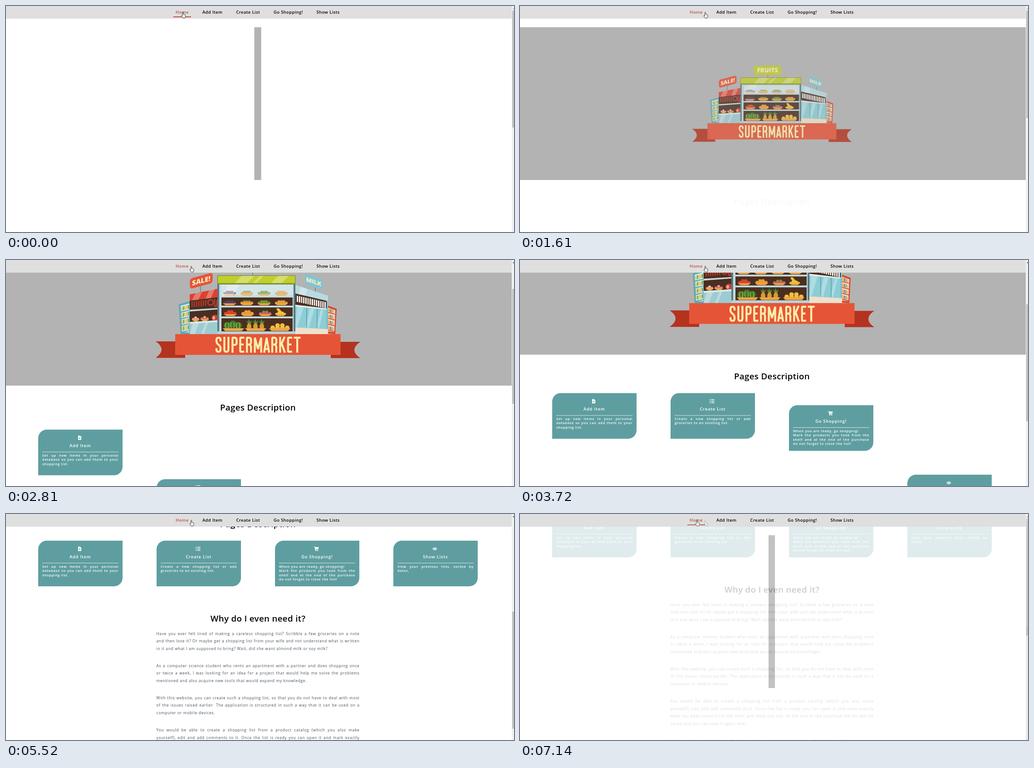
An HTML page that plays this animation: 1120x500 px, repeating every 7.21 s.

```html
<!DOCTYPE html>
<html lang="en">
<head>
<meta charset="utf-8">
<title>Shopping list</title>
<style>
html, body { margin: 0; width: 100%; height: 100%; overflow: hidden; background: #fff; }
body, .stage { position: absolute; width: 1120px; height: 500px; overflow: hidden; }
.stage { left: 0; top: 0; background: #fff; font-family: "Open Sans", "Noto Sans", sans-serif; }
.stage div, .stage svg { position: absolute; }
.page { left: 0; top: 0; width: 1115px; height: 1100px; }
.banner { left: 0; top: 47px; width: 1115px; height: 338px; background: #b3b3b3; transform-origin: 555px 0; }
.art { left: 0; top: 0; transform-origin: 555.5px 218px; }
h1 { position: absolute; left: 0; width: 1111px; margin: 0; text-align: center; font: 600 18.7px/26px "Open Sans", "Noto Sans", sans-serif; letter-spacing: .36px; color: #000; }
.card { top: 470px; width: 186.5px; height: 100.5px; background: #5f9ea0; border-radius: 18.7px 0; color: #fff; }
.card svg { left: 86.5px; top: 13px; }
.card h2 { position: absolute; left: 0; top: 29px; width: 100%; margin: 0; text-align: center; font-size: 9.33px; font-weight: 600; line-height: 14px; letter-spacing: .8px; }
.card hr { position: absolute; left: 9.5px; top: 48.5px; width: 167.5px; height: 1px; margin: 0; border: 0; background: #d9e7e7; }
.card p { position: absolute; left: 9.5px; top: 53px; width: 168px; margin: 0; font-size: 7.6px; font-weight: 600; line-height: 9.4px; letter-spacing: .65px; }
.text { left: 331.5px; top: 667.5px; width: 448px; font-size: 8.4px; line-height: 16.65px; letter-spacing: .69px; color: #434f5b; }
.text p { margin: 0 0 21.2px; }
p span { display: block; white-space: nowrap; }
p .full { text-align: justify; text-align-last: justify; }
.nav { left: 0; top: 0; width: 1115px; height: 28px; background: #dfdfdf; }
.nav b { position: absolute; top: 6.7px; font-size: 9.33px; font-weight: 600; line-height: 14px; letter-spacing: .43px; white-space: nowrap; color: #000; }
.nav b:first-child { color: #b9543f; }
.line { left: 368.5px; top: 22.7px; width: 39.5px; height: 2px; background: #c0503f; }
.bar { left: 1115px; top: 0; width: 5px; height: 500px; background: #f1f1f1; }
.thumb { left: 1px; top: 10px; width: 4px; background: #c1c1c1; }
.arrow { left: 2px; top: 4px; border: 3px solid transparent; border-top: 0; border-bottom: 3px solid #a3a3a3; }
.hand { left: 0; top: 13px; overflow: visible; }
</style>
</head>
<body>
<div class="stage">
  <div class="page">
    <div class="banner"></div>
    <svg class="art" width="1115" height="400"></svg>
    <h1 class="pages" style="top:419.7px">Pages Description</h1>
    <h1 class="why" style="top:629px">Why do I even need it?</h1>
    <div class="text"></div>
  </div>
  <div class="nav"></div>
  <div class="line"></div>
  <div class="bar"><div class="arrow"></div><div class="thumb"></div></div>
  <svg class="hand" width="10" height="14"><path d="M3 1.6Q3.2.5 4 .5T5 1.6V5.6L8.2 6.3Q9.5 6.7 9.5 8V10Q9.2 12 8.2 13.5H3.8Q2.4 11 .6 9.2Q.5 7.4 3 8.6Z" fill="#fff" stroke="#222" stroke-width=".9"/></svg>
</div>
<script>
const LOOP = 7210;
const stage = document.querySelector('.stage');
const $ = (root, name) => root.querySelector('.' + name);

// ---- page text ----
const lines = s => s.split('|').map(l =>
  l[0] === '-' ? `<span>${l.slice(1)}</span>` : `<span class="full">${l}</span>`).join('');

const menu = [['Home', 374], ['Add Item', 433], ['Create List', 507.5], ['Go Shopping!', 590], ['Show Lists', 684.5]];
$(stage, 'nav').innerHTML = menu.map(([s, x]) => `<b style="left:${x}px">${s}</b>`).join('');

const cards = [
  ['Add Item', 'Set up new items in your personal|database so you can add them to your|-shopping list.',
    '<path d="M2 0H6L9 3V10H2Z" fill="#fff"/><path d="M5.5 4V8M3.5 6H7.5" stroke="#5f9ea0"/>'],
  ['Create List', 'Create a new shopping list or add|-groceries to an existing list.',
    '<path d="M0 1.5H2M0 5H2M0 8.5H2M3.5 1.5H10.5M3.5 5H10.5M3.5 8.5H10.5" stroke="#fff" stroke-width="1.5"/>'],
  ['Go Shopping!', '-When you are ready, go shopping!|Mark the products you took from the|shelf and at the end of the purchase|-do not forget to close the list!',
    '<path d="M0 0H2.3L2.6 1.2H10.6L9.5 5.8H3.6L3.8 6.8H9.2V8H2.8L1.4 1.2H0Z" fill="#fff"/><circle cx="4" cy="9" r="1.1" fill="#fff"/><circle cx="8.4" cy="9" r="1.1" fill="#fff"/>'],
  ['Show Lists', 'View your previous lists, sorted by|-dates.',
    '<path d="M.3 5Q5.3-2 10.3 5Q5.3 12 .3 5Z" fill="#fff"/><circle cx="5.3" cy="5" r="2.1" fill="#fff" stroke="#5f9ea0"/>'],
];
$(stage, 'page').insertAdjacentHTML('beforeend', cards.map(([title, body, icon], i) =>
  `<div class="card" style="left:${70.5 + 261 * i}px"><svg width="11" height="10">${icon}</svg>
   <h2>${title}</h2><hr><p>${lines(body)}</p></div>`).join(''));

$(stage, 'text').innerHTML = [
  'Have you ever felt tired of making a careless shopping list? Scribble a few groceries on a note|and then lose it? Or maybe get a shopping list from your wife and not understand what is written|-in it and what I am supposed to bring? Wait, did she want almond milk or soy milk?',
  'As a computer science student who rents an apartment with a partner and does shopping once|or twice a week, I was looking for an idea for a project that would help me solve the problems|-mentioned and also acquire new tools that would expand my knowledge.',
  'With this website, you can create such a shopping list, so that you do not have to deal with most|of the issues raised earlier. The application is structured in such a way that it can be used on a|-computer or mobile devices.',
  'You would be able to create a shopping list from a product catalog (which you also make|yourself), edit and add comments to it. Once the list is ready you can open it and mark exactly|what has been taken from the shelf and what has not. At the end of the purchase the list will be|-saved and you can view it again later.',
  '-And most importantly, you will no longer be confused with almond milk and soy milk!',
].map(p => `<p>${lines(p)}</p>`).join('');

// ---- shop illustration ----
const poly = (fill, pts, more = '') => `<polygon points="${pts}" fill="${fill}" ${more}/>`;
const rect = (fill, x, y, w, h, more = '') => `<rect x="${x}" y="${y}" width="${w}" height="${h}" fill="${fill}" ${more}/>`;
const oval = (fill, x, y, rx, ry = rx) => `<ellipse cx="${x}" cy="${y}" rx="${rx}" ry="${ry}" fill="${fill}"/>`;
const repeat = (n, fn) => Array.from({ length: n }, (_, i) => fn(i)).join('');
const shine = pts => poly('#fff', pts, 'opacity=".3"');

// two rows of produce on a plate
function pile(x, y, w, color, r, top = color) {
  const n = Math.round(w / r / 1.9), step = (w - 2 * r) / (n - 1);
  return [1, 0].map(j => repeat(n - j * 2, i =>
    oval(j ? top : color, x + r + (i + j) * step, y - r * (.7 + j), r, r * .9))).join('')
    + poly('#eda548', `${x - 1},${y - 1} ${x + w + 1},${y - 1} ${x + w - 5},${y + 3} ${x + 5},${y + 3}`);
}

// a slanted row of bottles
const bottles = (x, y, n, dx, dy, h, colors) => repeat(n, i =>
  rect(colors[i % colors.length], x + i * dx, y + i * dy, dx * .62, h, 'rx="1"'));

const sign = (x, y, skew, w, h, fill, label, size) =>
  `<g transform="translate(${x} ${y}) skewY(${skew})">${rect(fill, -w / 2, -h / 2, w, h, 'rx="6"')}
   <text y="${size * .36}" text-anchor="middle" font-size="${size}" font-weight="800" fill="#fdf0c4">${label}</text></g>`;

const glyphs = {
  S: ['M11 10V7Q11 2 6.5 2T2 7V10Q2 14 6.5 17.5T11 25V28Q11 33 6.5 33T2 28V25', 17.4],
  U: ['M2 0V28Q2 33 6.5 33T11 28V0', 18],
  P: ['M2 35V2H6Q11 2 11 7V13Q11 18 6 18H2', 17],
  E: ['M11 2H2V33H11M2 17H9.5', 14.8],
  R: ['M2 35V2H6Q11 2 11 7V12Q11 17 6 17H2M6 17Q11 18 11 23V35', 17.4],
  M: ['M2 35V2L9 27 16 2V35', 21],
  A: ['M1.5 35L7 2 12.5 35M3 27H11', 17.4],
  K: ['M2 0V35M12 0L3 20M5.5 15L12.5 35', 17.4],
  T: ['M0 2H15M7.5 2V35', 15],
};
let penX = 462;
const lettering = [...'SUPERMARKET'].map(c => {
  const [d, advance] = glyphs[c], x = penX;
  penX += advance;
  return `<path d="${d}" transform="translate(${x} 170)"/>`;
}).join('');

const brown = '#4b2e20', lime = '#bfcf2c', ice = '#c3dde0', red = '#e65437', orange = '#f09a32', green = '#6f9a2e', plum = '#5b3f66';
const shelfColors = [plum, orange, green, '#e2a13a'];

const farLeft = poly('#5aa9b4', '381,98 406,91 406,164 385,164') + poly('#d8ebe6', '385,101 404,96 404,160 388,160')
  + repeat(4, j => bottles(387, 103 + j * 15, 5, 3.5, -.9, 9, ['#e9b43c', '#5c9440', '#d9c93a'])
    + poly('#5aa9b4', `385,${114 + j * 15} 404,${110 + j * 15} 404,${112 + j * 15} 385,${117 + j * 15}`));

const meat = poly(brown, '405,88 470,80 470,164 405,164')
  + repeat(7, i => rect('#b53a2c', 409 + i * 5, 91 - i * .5, 2.6, 14, 'rx="1.3"'))
  + `<g fill="none" stroke="#b53a2c" stroke-width="3"><circle cx="451" cy="94" r="6"/><path d="M460 86V102Q466 106 465 88"/></g>`
  + poly(ice, '405,110 470,106 470,109 405,114')
  + pile(410, 133, 16, '#ef9a8a', 3, '#f6c9bb') + pile(429, 132, 18, '#e2786a', 3, '#f0b3a4') + oval('#c8402f', 461, 128, 8, 7) + oval('#f0a394', 458, 128, 3, 4)
  + poly('#9ecbd1', '405,140 470,136 470,164 405,164') + shine('412,140 426,139 416,164 405,164') + shine('440,138 446,138 436,164 430,164')
  + poly('#d8ecee', '405,137 470,133 470,137 405,141')
  + poly('#df4030', '405,76 470,63 470,82 405,90') + shine('418,73 432,71 424,88 410,89') + shine('448,67 460,65 452,84 440,86');

const dairy = poly('#7fbfca', '638,62 710,81 710,164 638,164')
  + poly(brown, '638,72 707,89 707,109 638,101')
  + bottles(641, 79, 14, 4.7, 1.05, 14, ['#fbf6e8', '#fff', '#e9eef0'])
  + poly('#e3f0f0', '638,99 707,107 707,110 638,103')
  + poly('#8ccdd6', '638,103 706,110 706,153 638,149')
  + shine('642,103 656,105 643,148 638,148') + shine('670,107 680,108 668,150 660,150') + shine('694,109 700,110 690,152 684,152')
  + rect('#5f9fab', 662, 106, 1.6, 45) + rect('#5f9fab', 685, 108, 1.6, 44)
  + poly('#efe0cc', '638,149 710,153 710,164 638,164')
  + poly('#b8dbe2', '638,55 710,79 710,91 638,74') + shine('650,59 664,64 660,79 645,76');

const farRight = poly('#d8442f', '707,100 729,108 726,164 707,162') + poly('#ece4d2', '709,105 726,111 724,160 709,158')
  + repeat(4, j => bottles(710, 107 + j * 13, 4, 3.7, 1, 8, ['#e9b43c', '#d8442f', '#4e97a5'])
    + poly('#d8442f', `709,${115 + j * 13} 725,${119 + j * 13} 725,${121 + j * 13} 709,${117 + j * 13}`));

const melons = [0, 1, 2].map(i => oval('#3f7a2c', 488 + i * 12, 145 - i % 2 * 3, 8)
  + `<path d="M${485 + i * 12} 139q-3 6 0 12m5-12q3 6 0 12" fill="none" stroke="#a3bf4a" stroke-width="1.4"/>`).join('');
const pineapples = repeat(3, i => `<path d="M${534 + i * 14} 143l-4-9 4 3 1-7 3 7 4-3-3 9z" fill="#4f8f3a"/>`
  + oval('#d99a2e', 536 + i * 14, 148, 5, 8));

const centre = rect('#577a81', 466, 53, 172, 111) + rect(ice, 470, 54, 164, 108) + rect(brown, 475, 55, 157, 103)
  + rect('#cfe3e8', 475, 55, 157, 24)
  + [79, 101, 125].map(y => rect(ice, 470, y, 164, 4)).join('') + rect('#b9d3d8', 466, 158, 172, 6)
  + [76, 97].map(y => repeat(4, i => pile(479 + i * 38, y, 28, shelfColors[i], 3, i === 1 ? green : shelfColors[i]))).join('')
  + rect('#dbe9ec', 475, 55, 157, 24, 'opacity=".35"') + shine('490,55 515,55 500,79 476,79')
  + pile(481, 121, 27, '#dd4030', 3.8) + pile(519, 121, 27, orange, 3.8) + pile(558, 121, 27, '#d8616c', 3.4, green)
  + '<path d="M596 107Q600 120 616 119Q606 114 602 107Z" fill="#f2c433"/>' + pile(594, 121, 23, '#f2c433', 2.6)
  + melons + pineapples + pile(583, 153, 42, '#efc03c', 5)
  + [478, 527, 580].map(x => poly('#eda548', `${x},151 ${x + 47},151 ${x + 42},157 ${x + 5},157`)).join('')
  + rect(lime, 466.5, 34.5, 171, 19, 'stroke="#76801f"') + shine('520,35 548,35 530,53 502,53') + shine('560,35 568,35 550,53 542,53') + shine('600,35 624,35 606,53 582,53')
  + rect('#8f9a28', 467, 51, 170, 2);

const poles = rect('#6f7f84', 428, 58, 1.5, 14) + rect('#6f7f84', 543, 27, 1.5, 7) + rect('#6f7f84', 681, 58, 1.5, 12);
const signs = sign(430.5, 46, -15, 50, 23, red, 'SALE!', 15) + sign(543, 14, 0, 78, 27, lime, 'FRUITS', 17)
  + sign(678.5, 48, 18, 38, 24, '#82c4d4', 'MILK', 13);

const ribbon = '<path d="M330 180H395V216.5H330Q356 198 330 180ZM781 181H716V217H781Q755 199 781 181Z" fill="#b5321f"/>'
  + rect(red, 373, 164, 364.5, 46)
  + `<g role="img" aria-label="SUPERMARKET" fill="none" stroke="#fdeea7" stroke-width="4.3" stroke-linejoin="bevel">${lettering}</g>`;

$(stage, 'art').innerHTML = `<g transform="translate(0 107)">${poles}${farLeft}${farRight}${meat}${dairy}${centre}${signs}${ribbon}</g>`;

// ---- motion ----
const clamp = x => Math.min(1, Math.max(0, x));

// the CSS "ease" curve: cubic-bezier(.25, .1, .25, 1)
function ease(x) {
  if (x <= 0 || x >= 1) return clamp(x);
  let lo = 0, hi = 1, u;
  for (let i = 0; i < 24; i++) {
    u = (lo + hi) / 2;
    const bx = .75 * u * (1 - u) + u ** 3;
    if (bx < x) lo = u; else hi = u;
  }
  return .3 * u * (1 - u) ** 2 + 3 * u * u * (1 - u) + u ** 3;
}

function track(points, t) {
  const i = points.findIndex(p => p[0] > t);
  if (i === 0) return points[0][1];
  if (i < 0) return points[points.length - 1][1];
  const [t0, a] = points[i - 1], [t1, b] = points[i];
  return a + (b - a) * (t - t0) / (t1 - t0);
}

const scrolling = [[2150, 0], [2810, 107], [3720, 175.5], [4420, 238], [5520, 411], [5720, 411], [6270, 475]];
const thumbSize = [[1560, 259], [1610, 238], [2810, 254], [3100, 259]];
const pointer = [[140, 386], [420, 404.5]];

function pose(root, t) {
  const scroll = track(scrolling, t);
  const grow = ease((t - 655) / 2000);
  $(root, 'page').style.transform = `translateY(${-scroll}px)`;
  $(root, 'banner').style.transform = `scaleX(${ease((t + 17) / 700)})`;
  $(root, 'art').style.transform = `scale(${grow})`;
  $(root, 'art').style.opacity = grow;
  $(root, 'pages').style.opacity = ease((t - 1570) / 1000);
  $(root, 'why').style.opacity = ease((t - 4185) / 1000);
  $(root, 'text').style.opacity = ease((t - 4450) / 1000);
  root.querySelectorAll('.card').forEach((card, i) => {
    const rest = 1 - ease((t - 1619 - 520 * i) / 1500);
    card.style.transform = `translateY(${480 * rest}px)`;
  });
  $(root, 'thumb').style.top = 10 + scroll / 2 + 'px';
  $(root, 'thumb').style.height = track(thumbSize, t) + 'px';
  $(root, 'arrow').style.borderBottomColor = scroll ? '#505050' : '#a3a3a3';
  $(root, 'hand').style.transform = `translateX(${track(pointer, t)}px)`;
  $(root, 'line').style.opacity = t < 420 ? 1 : 0;
}

// the opening view, faded in on top at the end of each loop
const opening = stage.cloneNode(true);
document.body.append(opening);
pose(opening, 0);

const start = performance.now();
function tick() {
  const t = (performance.now() - start) % LOOP;
  pose(stage, t);
  opening.style.opacity = t < 6930 ? 0 : .2 * (1 + Math.floor((t - 6930) / 70));
  requestAnimationFrame(tick);
}
tick();
</script>
</body>
</html>
```
